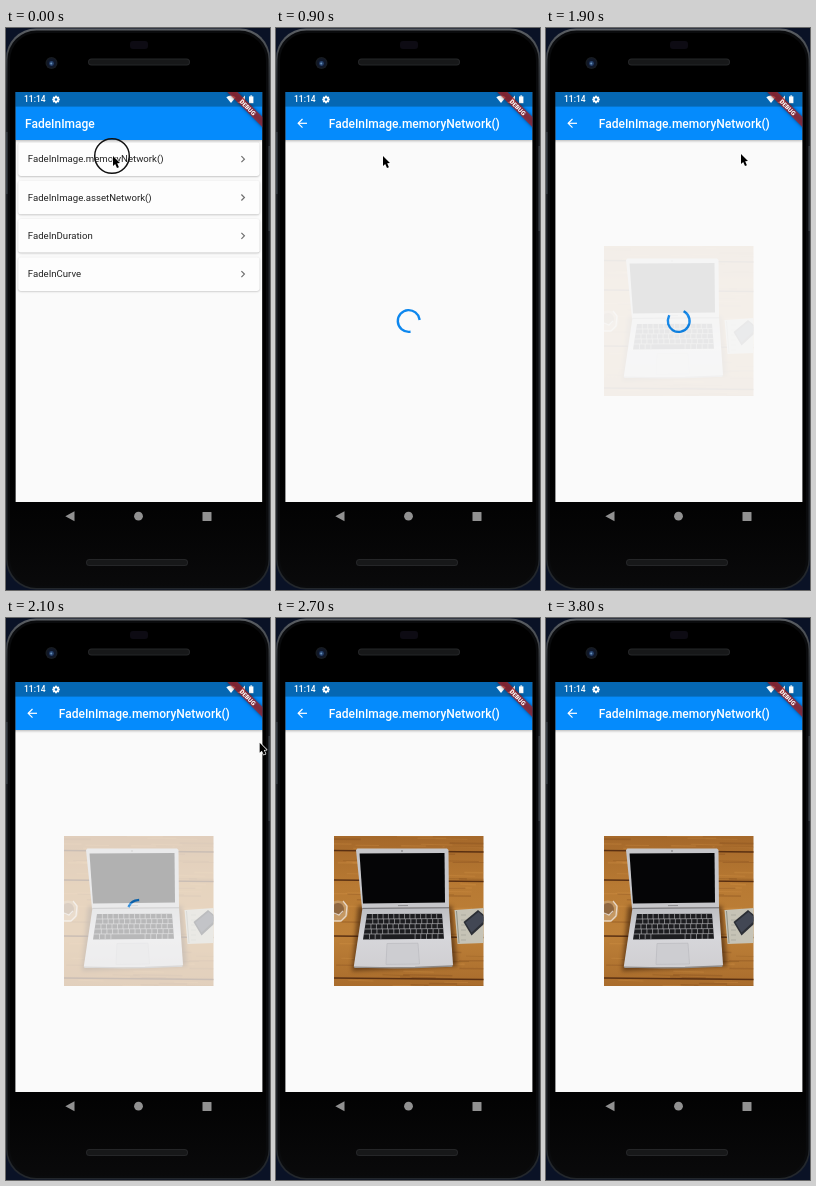
Recreate the animation shown at these times as an HTML page with a canvas. Size 264 by 562 pixels, loop 3.9 s.

```html
<!DOCTYPE html>
<html lang="en">
<head>
<meta charset="utf-8">
<title>FadeInImage</title>
<style>
html, body { margin: 0; width: 264px; height: 562px; overflow: hidden; background: #0a1122; }
canvas { display: block; width: 264px; height: 562px; }
</style>
</head>
<body>
<canvas id="stage"></canvas>
<script>
const W = 264, H = 562, LOOP = 3900, STEP = 100;
const SCREEN = { x: 9.4, y: 64, w: 247, h: 410 };
const BLUE = '#058bfc', TAU = Math.PI * 2;
const dpr = window.devicePixelRatio || 1;

function makeLayer(canvas = document.createElement('canvas')) {
  canvas.width = W * dpr;
  canvas.height = H * dpr;
  const c = canvas.getContext('2d');
  c.scale(dpr, dpr);
  return c;
}

function prerender(draw) {
  const c = makeLayer();
  draw(c);
  return c.canvas;
}

const clamp = v => Math.min(1, Math.max(0, v));
const progress = (t, start, duration) => clamp((t - start) / duration);

function seeded(seed) {
  return () => (seed = (seed * 16807) % 2147483647) / 2147483647;
}

function bezier(x1, y1, x2, y2) {
  const at = (a, b, s) => 3 * a * s * (1 - s) ** 2 + 3 * b * s * s * (1 - s) + s ** 3;
  return x => {
    if (x <= 0 || x >= 1) return clamp(x);
    let lo = 0, hi = 1;
    for (let i = 0; i < 24; i++) {
      const mid = (lo + hi) / 2;
      if (at(x1, x2, mid) < x) lo = mid; else hi = mid;
    }
    return at(y1, y2, lo);
  };
}
const easeIn = bezier(.42, 0, 1, 1);
const fastOutSlowIn = bezier(.4, 0, .2, 1);

function rect(c, x, y, w, h, color) {
  c.fillStyle = color;
  c.fillRect(x, y, w, h);
}

function round(c, x, y, w, h, r, color) {
  c.fillStyle = color;
  c.beginPath();
  c.roundRect(x, y, w, h, r);
  c.fill();
}

function disc(c, x, y, r, color) {
  c.fillStyle = color;
  c.beginPath();
  c.arc(x, y, r, 0, TAU);
  c.fill();
}

function trace(c, points) {
  c.beginPath();
  for (let i = 0; i < points.length; i += 2) c.lineTo(points[i], points[i + 1]);
}

function poly(c, points, color) {
  trace(c, points);
  c.closePath();
  c.fillStyle = color;
  c.fill();
}

function line(c, points, color, width) {
  trace(c, points);
  c.strokeStyle = color;
  c.lineWidth = width;
  c.stroke();
}

function label(c, text, x, y, size, weight, color) {
  c.font = `${weight} ${size}px Roboto, sans-serif`;
  c.textBaseline = 'alphabetic';
  c.fillStyle = color;
  c.fillText(text, x, y);
}

function vertical(c, y0, y1, ...colors) {
  const g = c.createLinearGradient(0, y0, 0, y1);
  colors.forEach((color, i) => g.addColorStop(i / (colors.length - 1), color));
  return g;
}

function drawPhone(c) {
  rect(c, 0, 0, W, H, '#0a1226');
  round(c, 0, .5, W, 561, 30, vertical(c, 0, 80, '#5c6065', '#33373c', '#23272c'));
  round(c, 1.5, 2.5, W - 3, 557.5, 29, '#0a0b0d');
  round(c, 4, 5, W - 8, 553, 27, vertical(c, 0, H, '#000', '#000', '#000', '#000', '#000', '#0a0a0b'));
  rect(c, 0, 104, 1.5, 62, '#3a4047');
  rect(c, 262.5, 118, 1.5, 85, '#3a4047');

  round(c, 124, 13, 18, 8, 3, '#0d0b13');
  disc(c, 45.5, 35, 6, '#181c22');
  disc(c, 45.5, 35, 4.6, '#10182a');
  disc(c, 45.5, 35.5, 2.4, '#27436e');
  disc(c, 45.2, 35.5, 1, '#6d95bd');
  for (const [x, y] of [[82, 30.5], [80, 531]]) {
    round(c, x, y, 102, 7, 3.5, '#252628');
    round(c, x + 1, y + 1, 100, 5, 2.5, '#171819');
  }

  const gray = '#919191';
  poly(c, [59.3, 488.2, 68.5, 483.2, 68.5, 493.2], gray);
  disc(c, 132.5, 488.2, 4.4, gray);
  round(c, 196.5, 484, 9, 9, .6, gray);
}

function drawBars(c) {
  const { x, y, w, h } = SCREEN;
  rect(c, x, y, w, h, '#fafafa');
  c.save();
  c.shadowColor = 'rgba(0,0,0,.28)';
  c.shadowBlur = 2.5 * dpr;
  c.shadowOffsetY = .7 * dpr;
  rect(c, x, y, w, 48, BLUE);
  c.restore();
  rect(c, x, y, w, 14.6, '#0567b3');
}

function drawList(c) {
  drawBars(c);
  label(c, 'FadeInImage', 19, 99.6, 12, 500, '#fff');
  const items = ['FadeInImage.memoryNetwork()', 'FadeInImage.assetNetwork()', 'FadeInDuration', 'FadeInCurve'];
  items.forEach((text, i) => {
    const mid = 131.2 + i * 38.3;
    c.save();
    c.shadowColor = 'rgba(0,0,0,.25)';
    c.shadowBlur = 2 * dpr;
    c.shadowOffsetY = .7 * dpr;
    round(c, 12.2, mid - 16.8, 241.4, 33.6, 2.4, '#fdfdfd');
    c.restore();
    label(c, text, 21.8, mid + 3.2, 9.6, 400, '#222');
    line(c, [235.4, mid - 3, 238.4, mid, 235.4, mid + 3], '#6f6f6f', 1.2);
  });
}

function drawDetail(c) {
  drawBars(c);
  line(c, [31, 95.3, 22.3, 95.3], '#fff', 1.2);
  line(c, [26.5, 91, 22.2, 95.3, 26.5, 99.6], '#fff', 1.2);
  label(c, 'FadeInImage.memoryNetwork()', 52.8, 99.6, 12, 500, '#fff');
}

function drawWood(c) {
  rect(c, 58, 218, 150, 150, vertical(c, 218, 368, '#a5682a', '#b87a33', '#bd8038', '#a96c2c'));
  const random = seeded(11);
  for (let i = 0; i < 110; i++) {
    const x = 50 + random() * 140, y = 218 + random() * 150;
    const color = random() < .5 ? 'rgba(105,58,18,.22)' : 'rgba(222,160,82,.2)';
    line(c, [x, y, x + 15 + random() * 35, y + random()], color, .6 + random() * 1.2);
  }
  for (const y of [232.5, 262, 318, 360]) line(c, [58, y, 208, y + 1.5], '#5a3012', 1.4);
}

function drawPhoto(c) {
  c.beginPath();
  c.rect(58, 218, 149.5, 150);
  c.clip();
  drawWood(c);
  c.save();
  c.filter = 'blur(2px)';
  poly(c, [82, 288, 176, 288, 181, 348, 76, 353], 'rgba(55,28,8,.6)');
  c.restore();

  disc(c, 62, 293, 10.5, 'rgba(215,200,182,.35)');
  disc(c, 62, 291, 6, 'rgba(110,72,42,.6)');
  line(c, [58, 303, 65, 303, 70, 298, 71, 288, 67, 283], 'rgba(240,232,222,.8)', 1.3);
  line(c, [58, 295, 63, 297, 67, 293], 'rgba(245,238,230,.75)', 1.2);

  poly(c, [178.5, 292, 208, 290, 208, 325, 181.5, 326], '#c6c3b6');
  line(c, [180.5, 293, 183, 325], '#8f9286', 1);
  for (let y = 297; y < 323; y += 5) line(c, [185, y, 190, y], '#9b9b93', .6);
  poly(c, [187.5, 304, 202, 292, 208, 297, 208, 306, 195.5, 317.5], '#2b2e35');
  poly(c, [189.5, 304.5, 202.5, 294, 208, 299, 208, 303, 195.5, 314.5], '#424754');

  poly(c, [80, 232, 81.5, 230.5, 171, 230.5, 172.5, 232, 173, 289.5, 86, 290], '#c6c6c9');
  poly(c, [83.5, 235.5, 168.5, 235, 169, 284.5, 87, 285.5], '#050506');
  disc(c, 126, 233, .7, '#555');
  line(c, [122, 287.6, 132, 287.5], '#88888b', .9);

  poly(c, [86.5, 289.7, 173, 289.2, 177, 346.5, 175.5, 348.8, 79.5, 350, 77.8, 348.5],
    vertical(c, 289, 350, '#bcbdc1', '#d6d6da', '#d0cfd2'));
  line(c, [86.5, 290.4, 173, 289.8], '#6d6d72', 1);
  line(c, [78, 349.2, 118, 349.8, 139, 349.5, 176.5, 348], '#8e8a88', 1.3);

  const left = y => 91 - (y - 296) * .16, right = y => 166 + (y - 296) * .08;
  poly(c, [left(296), 296, right(296), 295.7, right(321), 320.8, left(321), 321.4], '#1d1d20');
  for (let row = 1; row < 5; row++) {
    const y = 296 + row * 5;
    line(c, [left(y), y, right(y), y - .4], '#a9a9ad', .7);
  }
  for (let row = 0; row < 5; row++) {
    for (let key = 1; key < 14; key++) {
      if (row === 4 && key > 3 && key < 9) continue;
      const y = 296 + row * 5, shift = (row % 2) * .2;
      const x = left(y) + (right(y) - left(y)) * (key + shift) / 14;
      line(c, [x, y, x, y + 5], '#a9a9ad', .7);
    }
  }
  const pad = [111, 325.5, 142, 325.2, 143.5, 346, 110, 346.4];
  poly(c, pad, '#cdcdd1');
  line(c, [...pad, 111, 325.5], '#b8b8bc', .6);
}

function drawStatus(c) {
  label(c, '11:14', 18, 74.4, 8.5, 500, '#fff');
  c.save();
  c.translate(50, 71.5);
  for (let i = 0; i < 4; i++) {
    rect(c, -.9, -3.8, 1.8, 7.6, '#fff');
    c.rotate(Math.PI / 4);
  }
  disc(c, 0, 0, 2.8, '#fff');
  disc(c, 0, 0, 1.2, '#0567b3');
  c.restore();

  c.fillStyle = '#fff';
  c.beginPath();
  c.moveTo(225, 75);
  c.lineTo(220.3, 69.3);
  c.quadraticCurveTo(225, 65.6, 229.7, 69.3);
  c.fill();
  poly(c, [231.5, 75, 239, 75, 239, 67.5], '#fff');
  rect(c, 243, 68.4, 4.4, 6.8, '#fff');
  rect(c, 244.3, 67.4, 1.8, 1.2, '#fff');
}

function drawBanner(c) {
  c.save();
  c.translate(256.2, 65);
  c.rotate(Math.PI / 4);
  c.save();
  c.shadowColor = 'rgba(0,0,0,.75)';
  c.shadowBlur = 3.6 * dpr;
  rect(c, -26, 16.8, 52, 7.2, 'rgba(183,28,28,.68)');
  c.restore();
  c.textAlign = 'center';
  label(c, 'DEBUG', 0, 22.6, 6.1, 900, '#fff');
  c.restore();
}

function drawSpinner(c, elapsed) {
  const phase = elapsed / 1333 % 1;
  const head = fastOutSlowIn(clamp(phase * 2));
  const tail = fastOutSlowIn(clamp(phase * 2 - 1));
  const start = -Math.PI / 2 + tail * 1.5 * Math.PI + elapsed / 2222 * TAU + phase * Math.PI / 2;
  c.beginPath();
  c.arc(132.7, 293, 10.9, start, start + Math.max((head - tail) * 1.5 * Math.PI, .001));
  c.strokeStyle = '#0d87ee';
  c.lineWidth = 2.4;
  c.lineCap = 'square';
  c.stroke();
  c.lineCap = 'butt';
}

function drawCursor(c, x, y) {
  const arrow = [0, 0, 0, 10, 2.2, 8, 4, 12, 5.9, 11.2, 4.2, 7.3, 7, 7.1];
  c.save();
  c.translate(x, y);
  c.lineJoin = 'round';
  line(c, [...arrow, 0, 0], '#fff', 1.3);
  poly(c, arrow, '#000');
  c.restore();
}

const phone = prerender(drawPhone);
const list = prerender(drawList);
const photo = prerender(drawPhoto);
const detail = makeLayer();
const stage = makeLayer(document.getElementById('stage'));

function place(c, image, alpha = 1, dy = 0) {
  c.globalAlpha = alpha;
  c.drawImage(image, 0, dy, W, H);
  c.globalAlpha = 1;
}

function render(t) {
  const c = stage;
  const opened = progress(t, 340, 230);
  place(c, phone);
  c.save();
  c.beginPath();
  c.rect(SCREEN.x, SCREEN.y, SCREEN.w, SCREEN.h);
  c.clip();
  if (opened < 1) place(c, list);
  if (opened > 0) {
    const shown = easeIn(progress(t, 1720, 790));
    drawDetail(detail);
    if (shown < 1) drawSpinner(detail, Math.max(0, (t - 348) * 4 / 3));
    place(detail, photo, shown);
    place(c, detail.canvas, easeIn(opened), (1 - fastOutSlowIn(opened)) * SCREEN.h / 4);
  }
  drawStatus(c);
  drawBanner(c);
  c.restore();

  if (t < 300) {
    c.beginPath();
    c.arc(106, 128, 17.3, 0, TAU);
    c.strokeStyle = '#111';
    c.lineWidth = 1.5;
    c.stroke();
  }
  if (t < 2200) {
    const moved = progress(t, 1600, 600);
    drawCursor(c, 107 + moved * 176, 128 - moved * 4);
  }
}

function tick() {
  const t = performance.now() % LOOP;
  render(Math.floor(t / STEP) * STEP);
  requestAnimationFrame(tick);
}
tick();
</script>
</body>
</html>
```
